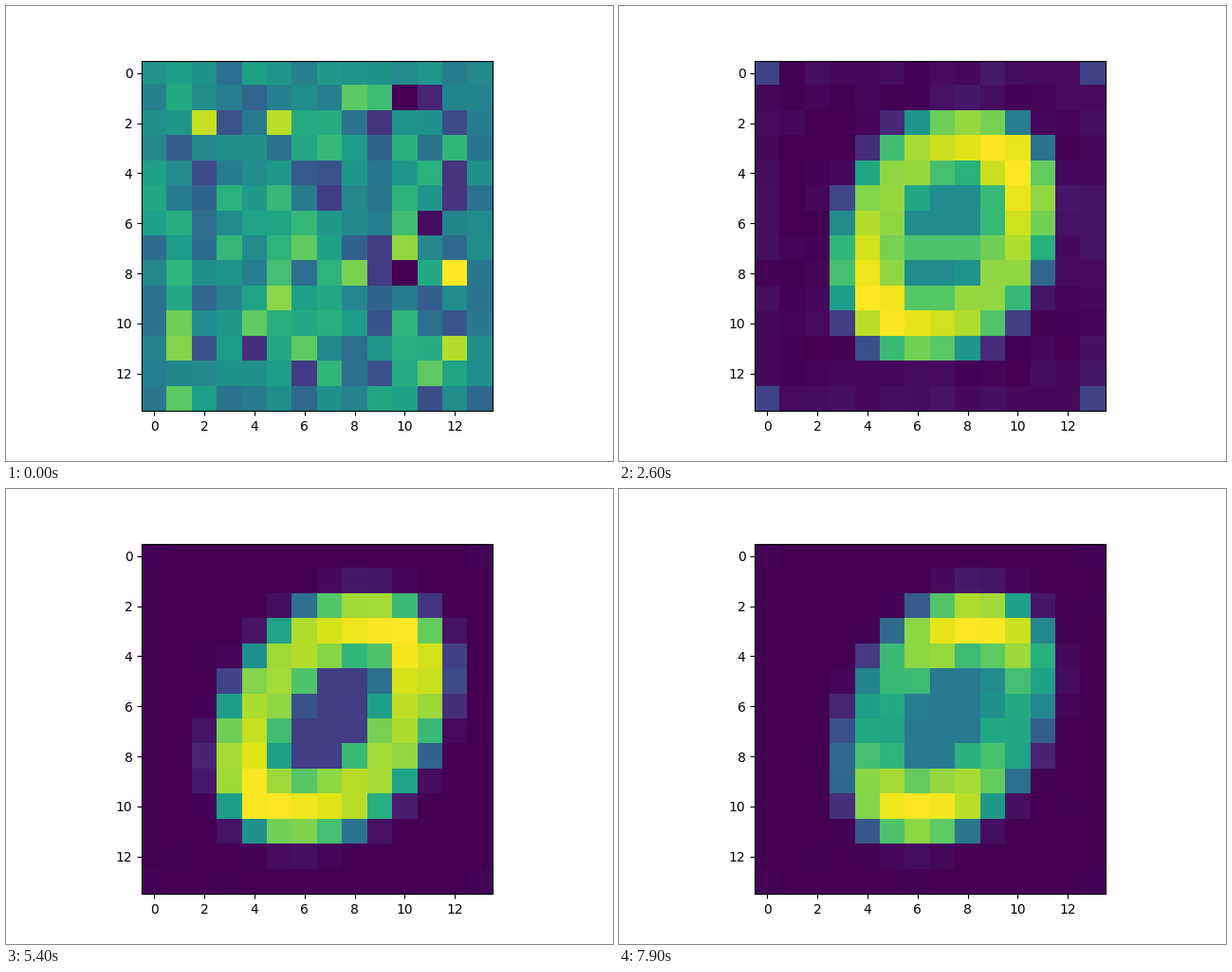
These frames come from a looping animation (640 px wide and 480 px high, 8000 ms). A matplotlib script:

```python
import numpy as np
import matplotlib.pyplot as plt
from matplotlib.animation import FuncAnimation

N = 14
FRAMES = 80
INTERVAL = 100
CY, RY = 6.45, 3.6          # vertical centre and radius of every digit
Y, X = np.mgrid[0:N, 0:N]
DEPTH = np.minimum.reduce([X, Y, N - 1 - X, N - 1 - Y])   # cells from the border


def brush(x, y, strength, width):
    """Paint a soft line through the sampled points."""
    dist = np.hypot(X[..., None] - x, Y[..., None] - y)
    return (strength * np.exp(-(dist / width) ** 4)).max(axis=2)


def zero(cx, rx, slant, level, swing, phase, inside, width=1.45):
    """Slanted oval; its stroke is strongest at `phase` and opposite to it."""
    a = np.linspace(0, 2 * np.pi, 120)
    dx = rx * np.sign(np.cos(a)) * np.abs(np.cos(a)) ** 0.8
    dy = RY * np.sin(a)
    strength = level + swing * np.cos(2 * (a - phase))
    outline = brush(cx + dx - slant * dy, CY + dy, strength, width)
    radius = np.hypot((X - cx + slant * (Y - CY)) / rx, (Y - CY) / RY)
    return np.maximum(outline, inside * np.exp(-(radius / 1.3) ** 6))


def bar(x0, x1, y, level):
    x = np.linspace(x0, x1, 30)
    return brush(x, np.full(30, y), level, 0.9)


def backdrop(edge, corner, fade, spread, seed):
    """Border glow that fades inwards, brighter in the corners."""
    field = edge * fade ** DEPTH
    field += np.random.default_rng(seed).normal(0, spread, (N, N))
    field[::N - 1, ::N - 1] = corner
    return field.clip(0, 1)


def normalise(field):
    return (field - field.min()) / (field.max() - field.min())


def speckle(seed):
    """Noise that is calm on the border and strong inside."""
    noise = np.random.default_rng(seed).normal(0, 1, (N, N))
    blob = 0.25 * np.exp(-((X - 5) ** 2 + (Y - 9.5) ** 2) / 3)
    return (0.48 + blob + noise * np.where(DEPTH > 0, 0.2, 0.09)).clip(0, 1)


eight = np.maximum.reduce([
    backdrop(.2, .54, .3, .03, 2),
    zero(6.9, 2.5, .15, .92, .06, 1.9, .67),
    bar(5, 9, 6.8, .8),
])
round_eight = np.maximum.reduce([
    backdrop(.03, .19, .3, .01, 3),
    zero(7.1, 2.9, .22, .87, .08, 2.2, .46),
    bar(5, 9, 7, .68),
])
wide_zero = np.maximum(backdrop(.01, .06, .3, .005, 4),
                       zero(6.85, 3.1, .08, .87, .12, 0, .45))
slanted_zero = np.maximum(backdrop(0, .01, .3, .002, 5),
                          zero(7.1, 3, .36, .93, .07, 2, .18))
open_zero = np.maximum(backdrop(0, .01, .3, .002, 6),
                       zero(7.2, 2.6, .32, .78, .2, np.pi / 2, .4))
rough_zero = np.maximum(backdrop(.46, .54, .5, .07, 7),
                        zero(7, 3.4, .3, .72, .22, 1.9, .12, width=1.1))

# (frame, field, easing power towards the next field)
KEYS = [
    (0, speckle(1), 0.6),
    (17, eight, 1),
    (26, round_eight, 1),
    (43, wide_zero, 1),
    (54, slanted_zero, 1),
    (63, (slanted_zero + open_zero) / 2, 1),
    (64, (speckle(8) + rough_zero) / 2, 0.7),   # sudden restart from noise
    (69, rough_zero, 0.7),
    (79, open_zero, 1),
]


def field_at(frame):
    for (start, a, power), (end, b, _) in zip(KEYS, KEYS[1:]):
        if frame <= end:
            t = ((frame - start) / (end - start)) ** power
            return normalise(a + (b - a) * t)


fig, ax = plt.subplots(figsize=(6.4, 4.8), dpi=100)
image = ax.imshow(field_at(0), cmap="viridis", vmin=0, vmax=1)


def update(frame):
    image.set_data(field_at(frame))
    return [image]


anim = FuncAnimation(fig, update, frames=FRAMES, interval=INTERVAL,
                     repeat=True, repeat_delay=0)
plt.show()
```
